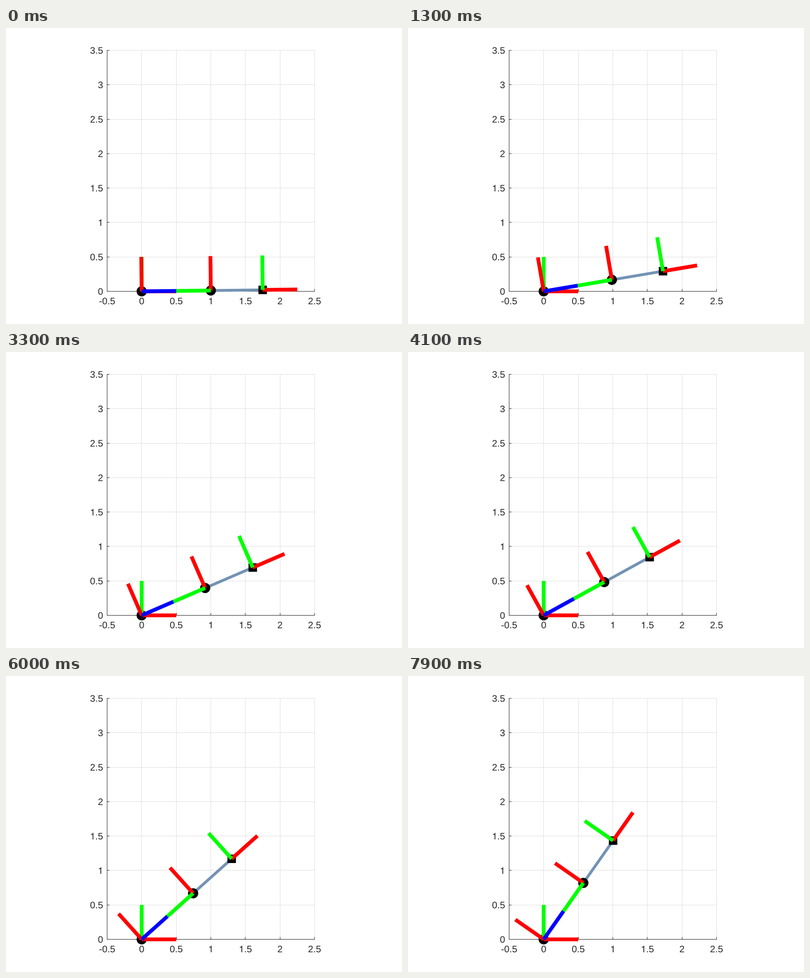
These frames come from a looping animation (840 px wide and 630 px high, 8 s). A matplotlib script:

```python
import numpy as np
import matplotlib.pyplot as plt
from matplotlib.animation import FuncAnimation
from matplotlib.patches import Circle, PathPatch, Rectangle
from matplotlib.path import Path
from matplotlib.textpath import TextPath

W, H, DPI = 840, 630, 100
FRAMES, INTERVAL = 80, 100
STEP = 0.012                      # joint rotation per frame, rad
L1, L2, AXIS = 1.0, 0.75, 0.5     # link lengths and triad arm length

ORIGIN = np.array([287.83, 69.5])
SCALE = np.array([440 / 3, 513 / 3.5])
RED, GREEN, BLUE = "#ff0000", "#00ff00", "#0000ff"
INK, GRID, LINK = "#262626", "#dfdfdf", "#7393b3"
FONT_PX = 20

fig = plt.figure(figsize=(W / DPI, H / DPI), dpi=DPI, facecolor="white")
ax = fig.add_axes([0, 0, 1, 1])
ax.set(xlim=(0, W), ylim=(0, H))
ax.axis("off")


def px(p):
    return ORIGIN + SCALE * np.asarray(p)


def line(a, b, color, width, z):
    (x0, y0), (x1, y1) = a, b
    return ax.plot([x0, x1], [y0, y1], color=color, lw=width * 72 / DPI,
                   solid_capstyle="butt", snap=False, zorder=z)[0]


def fill(patch, color, z):
    patch.set(facecolor=color, edgecolor="none", zorder=z, snap=False)
    return ax.add_patch(patch)


# A plain "1" without a foot, in em units.
ONE = Path(
    [(.359, 0), (.359, .703), (.301, .703), (.270, .594), (.250, .583),
     (.101, .566), (.101, .502), (.271, .502), (.271, 0), (.359, 0)],
    [Path.MOVETO, Path.LINETO, Path.LINETO, Path.CURVE4, Path.CURVE4,
     Path.CURVE4, Path.LINETO, Path.LINETO, Path.LINETO, Path.CLOSEPOLY])
ADVANCE = {".": .278, "-": .333}


def label(x, y, text, align):
    widths = [ADVANCE.get(c, .556) * FONT_PX for c in text]
    x -= align * sum(widths)
    for char, width in zip(text, widths):
        if char == "1":
            glyph = Path(ONE.vertices * FONT_PX + (x, y), ONE.codes)
        else:
            glyph = TextPath((x, y), char, size=FONT_PX,
                             prop={"family": "Liberation Sans"})
        fill(PathPatch(glyph), INK, 2)
        x += width


def draw_axes():
    left, bottom = 214.5, 69.5
    right, top = 654.5, 582.5
    for v in np.arange(-0.5, 2.6, 0.5):
        x = px((v, 0))[0]
        gx = np.floor(x) + 0.5
        line((gx, bottom), (gx, top + .5), GRID, 1, 0)
        line((gx, bottom), (gx, bottom + 5), INK, 1, 1)
        label(x, 42, f"{v:g}", 0.5)
    for v in np.arange(0, 3.6, 0.5):
        y = px((0, v))[1]
        gy = np.ceil(y - 1e-6) - 0.5
        line((left, gy), (right + .5, gy), GRID, 1, 0)
        line((left, gy), (left + 5, gy), INK, 1, 1)
        label(206, y - 7.2, f"{v:g}", 1)
    line((left, bottom - .5), (left, top + .5), INK, 1, 1)
    line((left - .5, bottom), (right + .5, bottom), INK, 1, 1)


draw_axes()

# Fixed base joint and triad.
base = px((0, 0))
fill(Circle(base, 10.8), "black", 4)
line(base, px((AXIS, 0)), RED, 8, 5)
line(base, px((0, AXIS)), GREEN, 8, 6)

# Moving links, markers and triad arms.
links = line(base, base, LINK, 6, 3)
elbow_dot = fill(Circle(base, 10.8), "black", 4)
tip_box = fill(Rectangle((0, 0), 18, 18), "black", 4)
arms = [line(base, base, color, 8, 7 + i)
        for i, color in enumerate([RED, BLUE, RED, GREEN, RED, GREEN])]


def update(i):
    theta = STEP * (i + 1)
    u = np.array([np.cos(theta), np.sin(theta)])
    n = np.array([-u[1], u[0]])
    root, elbow, tip = 0 * u, L1 * u, (L1 + L2) * u

    links.set_data(*np.transpose([px(root), px(tip)]))
    elbow_dot.center = px(elbow)
    tip_box.set_xy(px(tip) - 9)
    pairs = [(root, n), (root, u), (elbow, n), (elbow, -u), (tip, u), (tip, n)]
    for arm, (start, way) in zip(arms, pairs):
        arm.set_data(*np.transpose([px(start), px(start + AXIS * way)]))
    return [links, elbow_dot, tip_box, *arms]


anim = FuncAnimation(fig, update, frames=FRAMES, interval=INTERVAL,
                     repeat=True, repeat_delay=0, blit=False)
plt.show()
```
